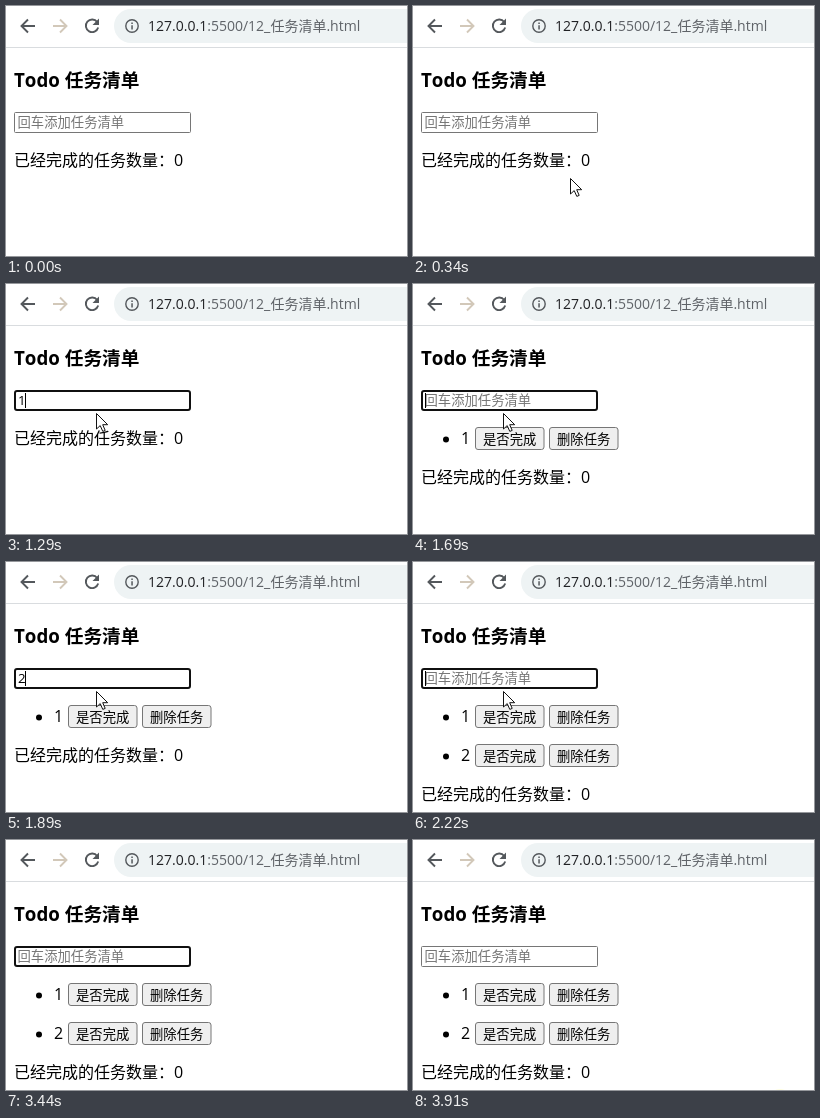
Animation of 401x250 px, one loop 3.98 s. Source, as an HTML page:

```html
<!DOCTYPE html>
<html lang="zh-CN">
<head>
<meta charset="utf-8">
<title>Todo 任务清单</title>
<style>
  html, body { margin: 0; width: 100%; height: 100%; overflow: hidden; background: #fff; }
  svg { display: block; width: 401px; height: 250px; }
  text { font-family: "Open Sans", "Noto Sans CJK SC", "Noto Sans CJK", sans-serif; font-size: 16px; font-kerning: none; }
  .title { font-size: 18.72px; font-weight: 700; }
  .url { font-size: 14px; fill: #5f6368; }
  .small { font-size: 13.333px; }
  .icon { fill: none; stroke: #54585c; stroke-width: 1.9; }
  .button { fill: #efefef; stroke: #767676; }
</style>
</head>
<body>
<svg viewBox="0 0 401 250">
  <rect width="401" height="250" fill="#fff"/>
  <rect y="41" width="401" height="1" fill="#d9dcdf"/>
  <rect x="108" y="3" width="330" height="34" rx="17" fill="#eef3f4"/>
  <path class="icon" d="M29 20H16M22 13.5L15.5 20L22 26.5"/>
  <path class="icon" style="stroke:#d2c8b9" d="M47 20H60M54 13.5L60.5 20L54 26.5"/>
  <path class="icon" d="M91.2 16A6.3 6.3 0 1 0 92.2 21.5"/>
  <path d="M93 12.5V19H86.5Z" fill="#54585c"/>
  <circle class="icon" cx="126" cy="20" r="6.2" style="stroke-width:1.4"/>
  <path d="M125.3 16.5h1.5v1.5h-1.5zM125.3 19.2h1.5v4.3h-1.5z" fill="#54585c"/>
  <text class="url" x="142" y="25"><tspan fill="#202124">127.0.0.1</tspan>:5500/12_任务清单.html</text>

  <text class="title" x="8" y="81">Todo 任务清单</text>
  <rect id="field" fill="#fff"/>
  <text id="hint" class="small" x="11.5" y="121" fill="#757575">回车添加任务清单</text>
  <text id="typed" class="small" x="12" y="121"></text>
  <rect id="caret" y="109" width="1" height="15"/>
  <g id="items"></g>
  <text id="count" x="8">已经完成的任务数量：0</text>

  <circle id="halo" r="12" fill="#fff500"/>
  <path id="beam" d="M95 120.5h2.5l1 1l1-1h2.5M98.5 121v14M95 135.5h2.5l1-1l1 1h2.5" fill="none" stroke="#444"/>
  <path id="arrow" d="M.5 .5V16L4.2 12.6L6.8 18.4L9.2 17.4L6.7 11.7H11.7Z" fill="#fff" stroke="#111"/>
</svg>
<script>
const LOOP = 3980;
const $ = id => document.getElementById(id);
const set = (el, attrs) => Object.entries(attrs).forEach(([k, v]) => el.setAttribute(k, v));
const show = (el, on) => { el.style.display = on ? '' : 'none'; };
const within = (t, from, to) => t >= from && t < to;

const button = (x, y, label) =>
  `<rect class="button" x="${x + .5}" y="${y + .5}" width="68.5" height="22" rx="2.5"/>
   <text class="small" x="${x + 8}" y="${y + 17}">${label}</text>`;

$('items').innerHTML = [1, 2].map(n => {
  const y = 104 + 39 * n;
  return `<g><circle cx="33" cy="${y + 12.5}" r="3"/><text x="48" y="${y + 17}">${n}</text>
    ${button(62, y, '是否完成')}${button(136, y, '删除任务')}</g>`;
}).join('');
const rows = [...$('items').children];

function pointer(t) {
  if (within(t, 70, 610)) {
    const p = Math.min(6, Math.floor((t - 70) / 68)) / 6;
    const e = 1 - (1 - p) ** 1.7;
    return [304 - 212 * e, 236 - 93 * e];
  }
  if (within(t, 1220, 3310)) {
    const p = Math.max(0, Math.floor((t - 2900) / 82)) / 4;
    const e = p ** 1.4;
    return [90 + 227 * e, 129 + 112 * e];
  }
  return null;
}

function render(t) {
  const focused = within(t, 610, 3840);
  const typed = within(t, 1290, 1690) ? '1' : within(t, 1890, 2220) ? '2' : '';
  const count = t >= 2220 ? 2 : t >= 1690 ? 1 : 0;

  set($('field'), focused
    ? { x: 9, y: 107, width: 175, height: 19, rx: 2, stroke: '#101010', 'stroke-width': 2 }
    : { x: 8.5, y: 106.5, width: 176, height: 20, rx: 1, stroke: '#767676', 'stroke-width': 1 });
  $('typed').textContent = typed;
  show($('hint'), !typed);
  set($('caret'), { x: typed ? 19 : 12 });
  const blinkOff = [[1150, 1290], [1820, 1890], [2420, 2900], [3440, 3840]];
  show($('caret'), focused && !blinkOff.some(([a, b]) => within(t, a, b)));

  rows.forEach((row, i) => show(row, i < count));
  set($('count'), { y: 160 + 39 * count });

  const leaving = t >= 3840;
  show($('halo'), leaving || within(t, 610, 750));
  set($('halo'), { cx: leaving ? 367 : 96, cy: leaving ? 261 : 127, opacity: t >= 3910 ? .12 : .62 });
  show($('beam'), within(t, 610, 1220));
  const tip = pointer(t);
  show($('arrow'), tip);
  if (tip) set($('arrow'), { transform: `translate(${tip.map(Math.round)})` });
}

const start = performance.now();
function tick() {
  render((performance.now() - start) % LOOP);
  requestAnimationFrame(tick);
}
tick();
</script>
</body>
</html>
```
